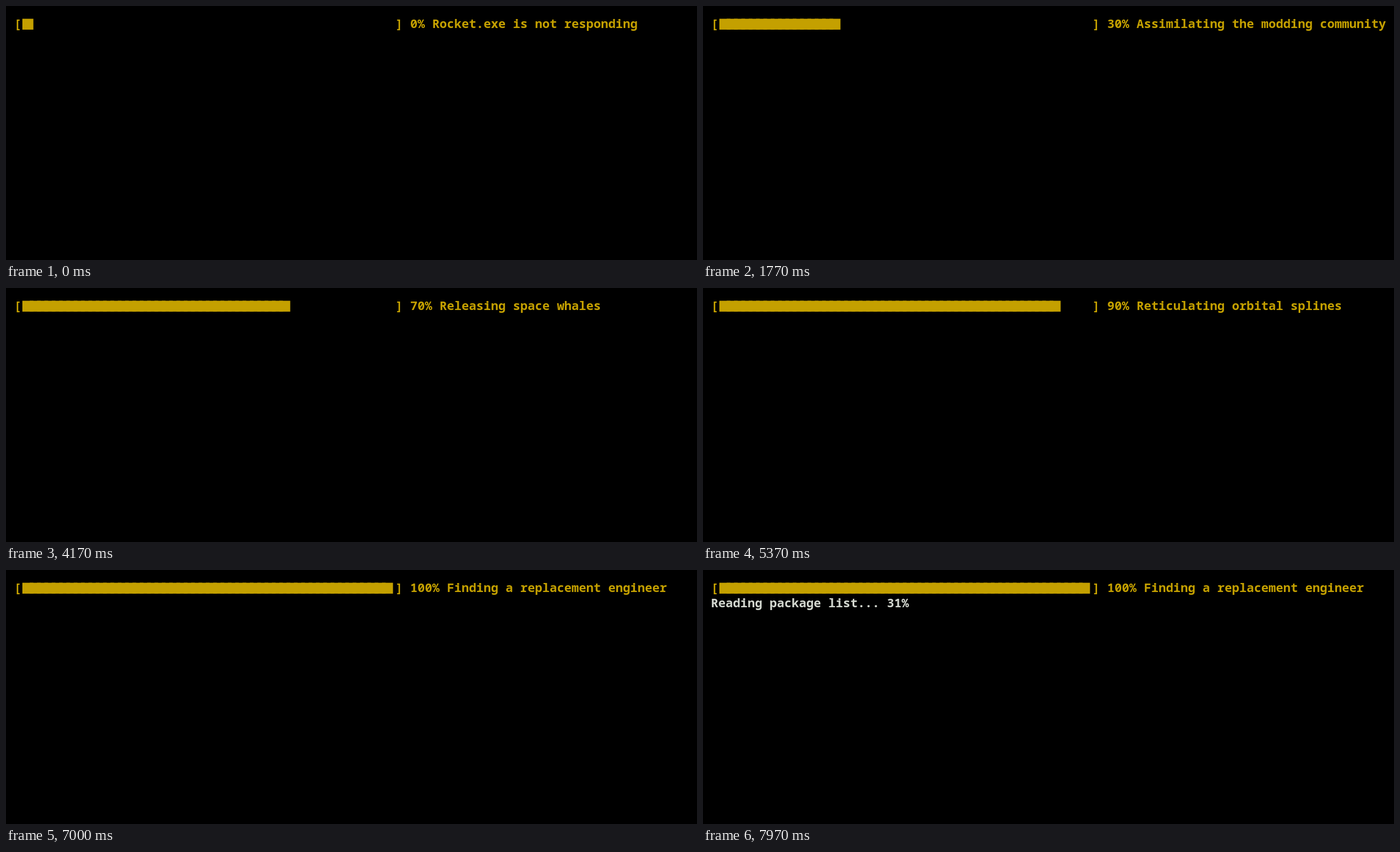
Animation, 1224 px wide and 450 px high, one loop 8000 ms. Source, as an HTML page:

```html
<!DOCTYPE html>
<html lang="en">
<head>
<meta charset="utf-8">
<title>Loading</title>
<style>
  html, body { margin: 0; width: 100%; height: 100%; overflow: hidden; background: #000; }
  svg { display: block; width: 1224px; height: 450px; }
  text {
    font: 600 21.667px "Noto Sans Mono", "DejaVu Sans Mono", monospace;
    font-variant-ligatures: none;
    white-space: pre;
  }
  .gold { fill: #c4a000; }
  .log { fill: #d3d7cf; }
</style>
</head>
<body>
<svg viewBox="0 0 1224 450">
  <g class="gold">
    <text x="14" y="39">[</text>
    <g id="bar"></g>
    <text x="690" y="39">]</text>
    <text id="status" x="716" y="39"></text>
  </g>
  <text id="log" class="log" x="14" y="66"></text>
</svg>
<script>
  const LOOP = 8000;
  const CELL = 13;
  const BLOCKS = 50;

  // [start ms, percent, message]
  const stages = [
    [0, 0, "Rocket.exe is not responding"],
    [570, 10, "Adding extra boosters"],
    [1170, 20, "Calibrating the snack launcher"],
    [1770, 30, "Assimilating the modding community"],
    [2400, 40, "Checking the staging order"],
    [2970, 50, "Porting VKG to a Velno 4420"],
    [3570, 60, "Warming up the rockets"],
    [4170, 70, "Releasing space whales"],
    [4770, 80, "Adding more struts"],
    [5370, 90, "Reticulating orbital splines"],
    [5970, 100, "Buying more snacks"],
    [7000, 100, "Finding a replacement engineer"]
  ];

  const bar = document.getElementById("bar");
  const status = document.getElementById("status");
  const log = document.getElementById("log");

  // Each block is wider than its cell, so neighbours overlap.
  const blocks = Array.from({ length: BLOCKS }, (_, i) => {
    const rect = document.createElementNS("http://www.w3.org/2000/svg", "rect");
    const box = { x: 29 + i * CELL, y: 22.6, width: 19.5, height: 19.3 };
    for (const key in box) rect.setAttribute(key, box[key]);
    return bar.appendChild(rect);
  });

  function setText(node, value) {
    if (node.textContent !== value) node.textContent = value;
  }

  function logLine(t) {
    if (t < 7200) return "";
    const step = Math.floor((t - 7330) * 18 / 640);
    return `Reading package list... ${7 + Math.round(step * 24 / 18)}%`;
  }

  function draw(t) {
    const [, percent, message] = stages.filter(([start]) => start <= t).pop();
    const filled = Math.min(BLOCKS, percent / 2 + 1);
    blocks.forEach((rect, i) => {
      rect.style.display = i < filled ? "" : "none";
    });
    setText(status, `${percent}% ${message}`);
    setText(log, logLine(t));
  }

  const begin = performance.now();
  function tick() {
    draw((performance.now() - begin) % LOOP);
    requestAnimationFrame(tick);
  }
  tick();
</script>
</body>
</html>
```
